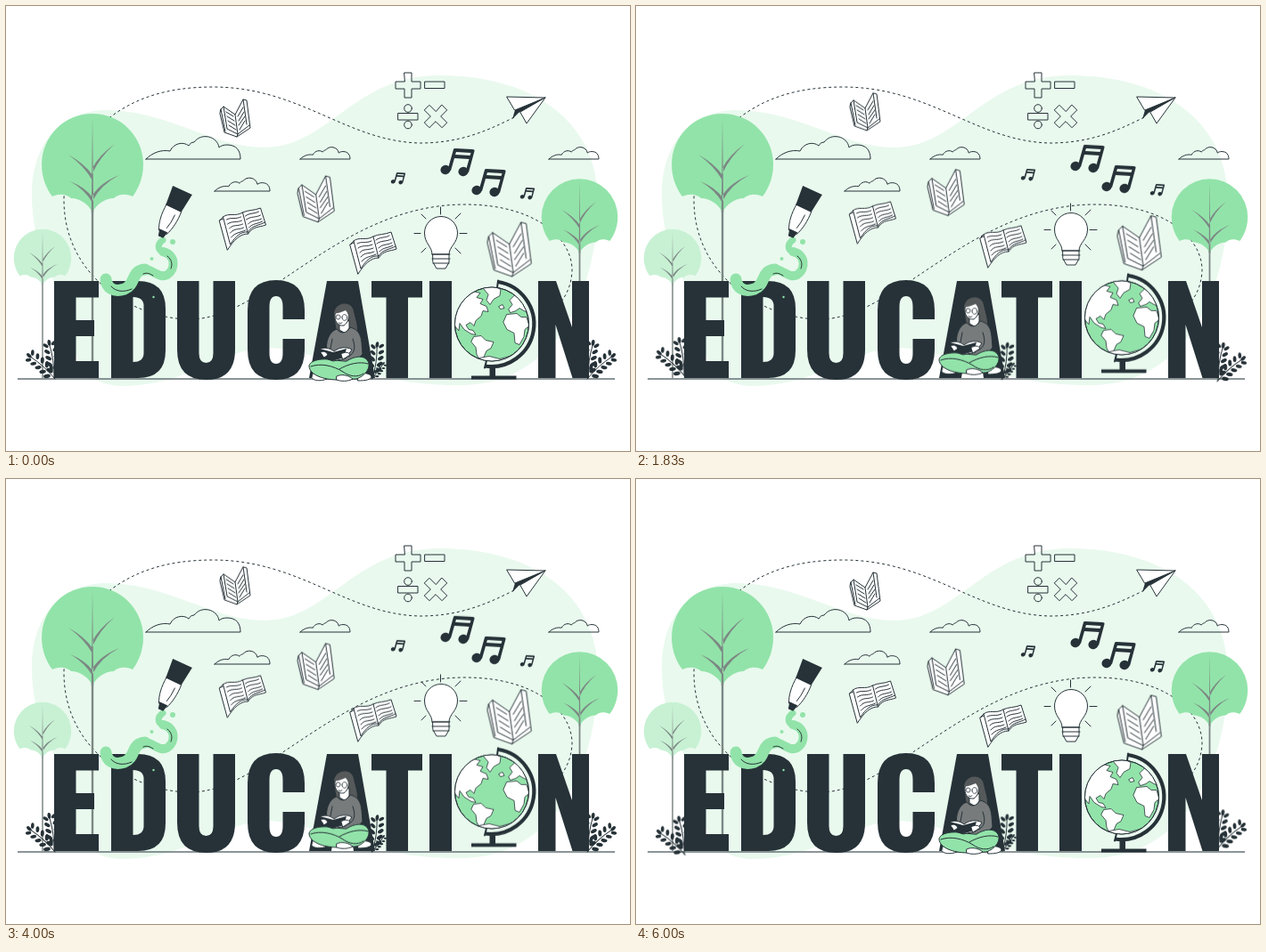
Recreate the animation shown at these times as an HTML page. Size 700 by 500 pixels, loop 6.04 s.

```html
<!DOCTYPE html>
<html lang="en">
<head>
<meta charset="utf-8">
<title>Education</title>
<style>
  html, body { margin: 0; width: 100%; height: 100%; overflow: hidden; background: #fff; }
  svg { display: block; width: 700px; height: 500px; }
  .dark { fill: #263238; }
  .mint { fill: #92e3a9; }
  .hair { fill: #56595a; }
  .line, .paper, .mintline { stroke: #263238; stroke-width: 1; stroke-linejoin: round; stroke-linecap: round; vector-effect: non-scaling-stroke; }
  .line { fill: none; }
  .paper { fill: #fff; }
  .mintline { fill: #92e3a9; }
  .wood { fill: none; stroke: #7c8784; }

  .float { animation: float 6.04s linear infinite; }
  .bob { animation: bob 6.04s linear infinite; }
  .wind { animation: wind 6.04s linear infinite; transform-origin: 352px 398px; }

  /* two 3 s swings, cut 40 ms into the next */
  @keyframes float {
    0%, 49.669%, 99.338% { transform: translateY(0); }
    24.834%, 74.503% { transform: translateY(-9.3px); }
    100% { transform: translateY(-.25px); }
  }
  /* four 1.5 s swings */
  @keyframes bob {
    0%, 24.834%, 49.669%, 74.503%, 99.338% { transform: translateY(0); }
    12.417%, 37.252%, 62.086%, 86.921% { transform: translateY(-9.3px); }
    100% { transform: translateY(-.5px); }
  }
  /* waits 1 s, then a 6 s sway that is cut by the loop */
  @keyframes wind {
    0%, 16.556% { transform: rotate(0deg); }
    41.391% { transform: rotate(1deg); }
    91.06% { transform: rotate(-1deg); }
    100% { transform: rotate(-.64deg); }
  }
</style>
</head>
<body>
<svg viewBox="0 0 700 500" role="img" aria-label="EDUCATION">
  <defs>
    <g id="tree">
      <path fill="currentColor" d="M-57 0A57 57 0 0 1 57 0C57 14 52 27 45 36C35 31 27 35 24 38C14 38 4 45 0 54C-4 45 -14 38 -24 38C-27 35 -35 31 -45 36C-52 27 -57 14 -57 0Z"/>
      <path fill="#7c8784" d="M0 -52L1.2 54H-1.200ZM0 18Q-9 2 -27 -11Q-8 0 0 12ZM0 10Q8 -8 25 -23Q7 -10 0 4ZM0 43Q-9 28 -25 19Q-8 26 0 37ZM0 41Q9 23 30 12Q8 21 0 35Z"/>
    </g>
    <path id="cloud" class="line" d="M0 0H106C106 -9 102 -16 91 -16C87 -16 84 -15 82 -13C80 -26 62 -30 54 -19C51 -19 49 -17 48 -15C42 -20 31 -18 27 -9C17 -11 7 -7 0 0Z"/>
    <g id="upright">
      <path class="paper" d="M0 16L5 37L19 42L34 32L30 1L26 0L17 17L4 8L1 11Z"/>
      <path class="line" d="M4 8L8 33L20 39L33 29M17 17L20 39M1 11L6 36M26 0L30 28M20 39L19 42"/>
      <path class="line" d="M7 14L15 19M8 19L16 24M9 24L17 29M10 29L18 34M20 19L26 9M21 24L27 14M21 29L28 19M22 34L28 24"/>
    </g>
    <g id="open">
      <path class="paper" d="M0 14L4 10C10 5 18 10 26 5C32 2 39 3 46 0L52 19C44 22 38 20 32 29C23 29 16 36 9 47Z"/>
      <path class="line" d="M4 10L12 41C18 32 24 26 32 27C37 19 44 20 51 16M26 5L32 29M0 14L4 12"/>
      <path class="line" d="M8 13C13 10 18 13 24 10M9 18C14 14 19 17 25 14M11 23C15 18 20 21 26 18M12 28C17 22 21 25 27 22M13 33C18 27 23 28 29 25M29 9C34 5 39 7 44 4M30 13C35 9 41 11 46 8M32 18C36 13 42 15 47 12M33 22C37 17 43 18 48 15"/>
    </g>
    <g id="note" class="dark">
      <ellipse cx="5" cy="24" rx="5.6" ry="5.2" transform="rotate(-15 5 24)"/>
      <ellipse cx="25" cy="26" rx="5.6" ry="5.2" transform="rotate(-15 25 26)"/>
      <path d="M14 1Q14 0 16 0L35 1Q38 1 37.500 3L31 27L27.500 26L31.500 12L15 11L11 25L7.500 24ZM17 4L16 7L32.500 8L33.500 5Z" fill-rule="evenodd"/>
    </g>
    <path id="cross" class="line" d="M-4 -14H4V-4H14V4H4V14H-4V4H-14V-4H-4Z"/>
    <g id="twig">
      <path class="line" d="M0 0Q3 -20 0 -38"/>
      <g class="dark" id="leaves"></g>
    </g>
    <g id="bush">
      <use href="#twig" transform="translate(54 418) rotate(-8)"/>
      <use href="#twig" transform="translate(55 419) rotate(-48) scale(.98)"/>
    </g>
    <clipPath id="ball"><circle r="41.500"/></clipPath>
  </defs>

  <path fill="#e9f9ee" d="M29 212C29 154 62 117 113 117C185 118 230 159 292 159C363 157 390 78 486 78C589 78 664 128 664 219C664 318 618 426 510 426C400 427 350 384 292 384C240 386 205 427 128 427C65 423 78 360 54 310C39 280 29 250 29 212Z"/>
  <path class="line" stroke-dasharray="3 3" style="stroke-linecap:butt" d="M570 125C535 143 505 154 464 154C382 152 330 91 232 91C180 91 145 104 118 124C80 150 65 184 65 218C65 305 145 352 207 352C292 351 375 223 515 223C595 223 636 262 635 298C634 315 628 326 620 336"/>

  <use href="#cloud" x="157" y="172"/>
  <use href="#cloud" transform="translate(330 172) scale(.528)"/>
  <use href="#cloud" transform="translate(234 208) scale(.585)"/>
  <use href="#cloud" transform="translate(609 172) scale(.528)"/>

  <g class="wood">
    <path stroke-width="2.400" d="M97 225V418"/>
    <path stroke-width="1.800" d="M643.500 270V418"/>
    <path stroke-width="1.500" d="M41 305V418"/>
  </g>
  <use href="#tree" color="#92e3a9" transform="translate(97 178)"/>
  <use href="#tree" color="#92e3a9" transform="translate(643.500 237) scale(.75)"/>
  <use href="#tree" color="#c8f1d4" transform="translate(41 283) scale(.565)"/>

  <path d="M13 419H683" stroke="#657074" stroke-width="1.300"/>

  <g class="dark" fill-rule="evenodd">
    <path d="M54 309H104V327.500H78.500V353H99V371H78.500V399H104V418H54Z"/>
    <path d="M118 309H148Q179 309 179 340V387Q179 418 148 418H118ZM142.500 327V400Q154.500 400 154.500 390V337Q154.500 327 142.500 327Z"/>
    <path d="M192 309H216.500V390Q216.500 401 224.500 401Q232.500 401 232.500 390V309H257V386Q257 420 224.500 420Q192 420 192 386Z"/>
    <path d="M271 342Q271 308 303 308Q335 308 335 342V352H310.500V338Q310.500 326 303 326Q295.500 326 295.500 338V390Q295.500 402 303 402Q310.500 402 310.500 390V374H335V386Q335 420 303 420Q271 420 271 386Z"/>
    <path d="M360 309H395L414 418H390L387 398H368L365 418H340ZM377 334L371 381H383Z"/>
    <path d="M410 309H467V327.500H451V418H426.500V327.500H410Z"/>
    <path d="M475 309H500V418H475Z"/>
    <path d="M597 309H617L635 361V309H654V418H635.500L616.500 358V418H597Z"/>
  </g>

  <use href="#cross" x="451" y="89"/>
  <use href="#cross" transform="translate(482 124) rotate(45)"/>
  <g class="line">
    <path d="M470 85H492V92.500H470ZM440 120.500H462V128H440Z"/>
    <circle cx="451" cy="115" r="4.300"/>
    <circle cx="451" cy="133.500" r="4.300"/>
  </g>

  <path class="paper" d="M562 102L605 103L571 117Z"/>
  <path class="dark" d="M571 117L605 103L575 120L568 127Z"/>
  <path class="paper" d="M605 103L584 132L577 119.500Z"/>

  <g fill="none" stroke="#92e3a9" stroke-linecap="round" stroke-linejoin="round">
    <path stroke-width="7" d="M176 263C170 267 169 274 176 276"/>
    <path stroke-width="10" d="M176 276C190 279 191 295 181 302C172 307 165 296 156 296"/>
    <path stroke-width="13" d="M156 296C140 297 146 313 133 318C121 322 113 317 112 307"/>
  </g>
  <g class="mint">
    <circle cx="187" cy="265" r="3"/>
    <circle cx="163.500" cy="284" r="2"/>
    <circle cx="165.500" cy="327" r="1.200"/>
  </g>
  <path class="line" d="M118 315C123 321 132 322 141 318M154 301C158 299 162 301 165 303M181 281C186 285 187 290 185 295"/>
  <g transform="translate(198 207) rotate(25)">
    <path class="paper" d="M-9.500 22H9C10 34 8 45 5 52H-5C-9 44 -10.500 34 -9.500 22Z"/>
    <path class="line" d="M4 29Q4 39 2 46"/>
    <path class="dark" d="M-12 0H12L9 23H-10ZM-5 50H5L3 58H-3Z"/>
  </g>

  <g class="float">
    <use href="#upright" x="240" y="105"/>
    <use href="#upright" transform="translate(327 191) scale(1.210 1.230)"/>
    <use href="#upright" transform="translate(540 243) scale(1.450)"/>
    <use href="#open" x="239.500" y="227"/>
    <use href="#open" x="386" y="254"/>
  </g>

  <g class="bob">
    <use href="#note" x="488" y="160"/>
    <use href="#note" x="523" y="183"/>
    <use href="#note" transform="translate(432 187) scale(.43)"/>
    <use href="#note" transform="translate(577 204) scale(.43)"/>
    <path class="paper" d="M478 279C478 270 469.500 267 469.500 255A18.500 18.500 0 0 1 506.500 255C506.500 267 497 270 497 279Z"/>
    <path class="paper" d="M479 279H497V288L493 295H483L479 288ZM478 279H498M478 284H498M479 289H497"/>
    <path class="line" d="M487.500 226V234M458 255.500H465M509 255.500H517M466 234L471 239M504 239L510 233M466 277L471 272M504 272L510 278"/>
  </g>

  <g class="wind">
    <use href="#bush"/>
    <use href="#bush" transform="matrix(-1 0 0 1 707 0)"/>
    <use href="#twig" transform="translate(411 419) rotate(8) scale(.97)"/>
    <use href="#twig" transform="translate(410 419) rotate(38) scale(.55)"/>
  </g>

  <g class="float">
    <g transform="translate(545 357.500)">
      <path class="line" style="stroke-width:4.200;stroke-linecap:butt" d="M7 -47.500A47.500 47.500 0 0 1 -8 47"/>
      <path class="line" style="stroke-width:2" d="M7 -49L6 -41M-8 49L-6 41"/>
      <path class="dark" d="M-2.500 47H4V58H-2.500ZM-23 58H27.500V62H-23Z"/>
      <circle class="mintline" r="41.500"/>
      <g clip-path="url(#ball)" class="paper" style="stroke-width:.8">
        <path d="M-43 0L-39 -20L-31 -32L-21 -37L-13 -35L-17 -30L-10 -28L-13 -23L-6 -20L-4 -14L-10 -15L-12 -9L-18 -4L-20 2L-24 -2L-29 1L-26 6L-21 7L-18 12L-23 11L-31 6L-36 -1L-37 7Z"/>
        <path d="M-20 14L-12 13L-7 18L2 20L-1 27L-6 30L-9 37L-14 40L-17 34L-18 26L-23 20Z"/>
        <path d="M-10 -41L2 -43L10 -39L9 -32L2 -28L-2 -22L-6 -27L-4 -33Z"/>
        <path d="M17 -11L28 -12L33 -8L39 -8L42 2L37 6L36 14L31 23L26 21L25 10L17 6L13 -2Z"/>
        <path d="M19 -17L23 -22L20 -27L27 -34L36 -29L42 -13L36 -15L31 -18L27 -15L21 -13Z"/>
        <path d="M8 -20L12 -22L14 -18L10 -17ZM-20 39L-3 36L9 39L20 36L13 44H-13Z"/>
      </g>
      <circle class="line" r="41.500"/>
    </g>
  </g>

  <g class="float">
    <path class="hair" d="M368 347C368 333 385 331 389 340C391 350 396 360 393 370L371 366Z"/>
    <path class="paper" d="M374 355V364L381 368L385 362V354Z"/>
    <path class="paper" d="M369 346C370 340 378 338 383 342C386 348 384 356 379 359C372 360 368 354 369 346Z"/>
    <path class="hair" d="M368 346C370 334 384 332 389 340C391 347 392 354 394 362L388 360C385 354 386 348 381 342C377 344 372 345 368 346Z"/>
    <path class="line" style="stroke-width:.8" d="M370 349A2.500 2.500 0 1 0 375 350A2.500 2.500 0 1 0 370 349M377 350A2.800 2.800 0 1 0 382.500 350A2.800 2.800 0 1 0 377 350M373 356Q375 357.500 377 356"/>
    <path fill="#777b7c" stroke="#263238" d="M371 363C376 369 382 368 386 361C394 363 398 368 399 378L400 391L391 401H364L360 389C358 378 362 366 371 363Z"/>
    <path class="line" d="M389 374C392 383 392 390 384 394M366 374L364 385"/>
    <path class="paper" d="M395 414C400 412 407 412 410 416C410 420 403 421 395 421ZM344 413C348 412 355 414 360 419C353 422 345 421 343 418Z"/>
    <path class="mintline" d="M368 398C355 395 340 398 340 405C341 414 355 420 372 420L393 419C402 416 410 407 406 399C402 392 391 393 382 399Z"/>
    <path class="line" d="M342 405C353 401 367 404 378 411C385 416 394 418 401 413M374 408C384 402 397 399 406 402"/>
    <path class="paper" d="M371 416C376 413 385 415 389 419C384 422 375 422 371 420Z"/>
    <path class="paper" d="M353 385C359 383 364 385 368 388C373 384 381 382 388 386L381 396L367 399L354 394Z"/>
    <path class="dark" d="M352 385L367 389L382 385L379 395L366 399L354 395Z"/>
    <path class="paper" d="M353 389C356 387 360 389 361 392L357 395ZM376 391C380 388 385 389 386 392L378 397Z"/>
  </g>
</svg>
<script>
  const leaves = document.getElementById("leaves");
  const addLeaf = (x, y, turn, size) => {
    const leaf = document.createElementNS("http://www.w3.org/2000/svg", "ellipse");
    leaf.setAttribute("rx", 3.8 * size);
    leaf.setAttribute("ry", 2.1 * size);
    leaf.setAttribute("transform", `translate(${x} ${y}) rotate(${turn})`);
    leaves.append(leaf);
  };
  for (let i = 1; i <= 5; i++) {
    const k = i / 5.4;
    const x = 6 * k * (1 - k), y = -38 * k;
    const size = 1.1 - .25 * k;
    addLeaf(x - 4.7, y - 2, 38, size);
    addLeaf(x + 4.7, y - 4, -38, size);
  }
  addLeaf(0, -40, 90, .9);
</script>
</body>
</html>
```
